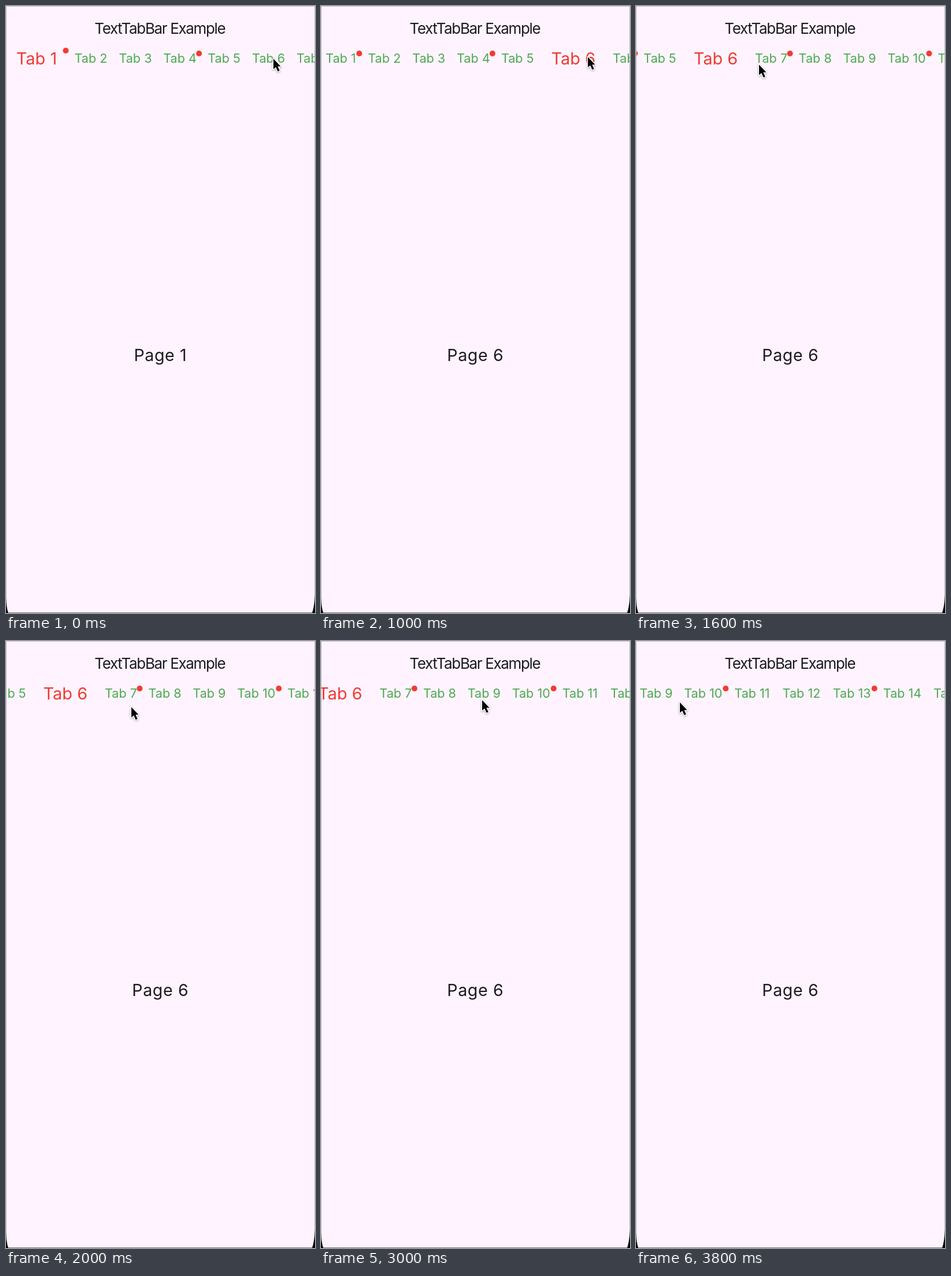
Write an HTML page that moves like this. It is 535 px wide and 1048 px high and loops after 4300 ms.

```html
<!DOCTYPE html>
<html lang="en">
<head>
<meta charset="utf-8">
<title>TextTabBar Example</title>
<style>
  html, body { margin: 0; width: 100%; height: 100%; overflow: hidden; background: #fef3fe; }
  svg { display: block; width: 535px; height: 1048px; }
  text { font-family: Inter, "Open Sans", sans-serif; fill: #1d1b20; }
  .title, .page { text-anchor: middle; }
  .title { font-size: 26px; letter-spacing: -1.36px; }
  .page { font-size: 28.6px; letter-spacing: .6px; }
  #cursor { filter: drop-shadow(0 1.5px 1.5px rgba(0, 0, 0, .35)); }
</style>
</head>
<body>
<svg viewBox="0 0 535 1048">
  <rect width="535" height="1048" fill="#fef3fe"/>
  <text class="title" x="266.3" y="47.6">TextTabBar Example</text>
  <g id="pages">
    <text class="page" x="267.3" y="613">Page 1</text>
    <text class="page" x="802.3" y="613">Page 6</text>
  </g>
  <g id="tabs"></g>
  <g fill="none" stroke="#c4bcc5">
    <path d="M.5 1030V.5H534.5V1030"/>
    <path d="M3 1047.5H532" stroke="#777278"/>
  </g>
  <path d="M0 1021Q.5 1038 4 1048H0ZM535 1016Q534 1037 530 1048H535Z"/>
  <g id="cursor">
    <path d="M0 0V18L4.2 14.4L7.6 22L10.8 20.6L7.4 13.2H12.6Z"
      stroke="#fff" stroke-width="3" stroke-linejoin="round" paint-order="stroke"/>
  </g>
</svg>
<script>
const LOOP = 4300, STEP = 100;
const GREEN = [76, 170, 81], RED = [238, 59, 51];
const ROW_X = -1.3, ROW_Y = 90.2, FONT_SIZE = 21.6;
const NARROW_DIGIT = { 1: 3.8, 7: 1.4 };

// Pointer tip at the turning points of its path: time, x, y
const POINTER = [
  [0, 463, 91], [1000, 462, 88], [1400, 211, 95], [2000, 217, 114],
  [2400, 372, 101], [2700, 372, 101], [3000, 279, 102], [3400, 118, 106], [3800, 76, 106]
];

const mix = (a, b, p) => a + (b - a) * p;
const progress = (t, start, duration) => Math.min(1, Math.max(0, (t - start) / duration));
// Speeds up by the power of attack, then coasts to rest by the power of decay
const fling = (p, attack, decay) => 1 - (1 - p ** attack) ** decay;

function scrollAt(t) {
  return 334 * fling(progress(t, 1000, 1000), 1.5, 3.6)
       + 317 * fling(progress(t, 2700, 1100), 1.9, 2.8);
}

function pointerAt(t) {
  const i = POINTER.findIndex(point => point[0] > t);
  if (i < 0) return POINTER[POINTER.length - 1].slice(1);
  const [from, x, y] = POINTER[i - 1], [to, nextX, nextY] = POINTER[i];
  const p = progress(t, from, to - from);
  return [mix(x, nextX, p), mix(y, nextY, p)];
}

function add(parent, tag) {
  return parent.appendChild(document.createElementNS('http://www.w3.org/2000/svg', tag));
}

function set(node, attrs) {
  for (const key in attrs) node.setAttribute(key, attrs[key]);
}

const [pages, row, cursor] = ['pages', 'tabs', 'cursor'].map(id => document.getElementById(id));

const tabs = Array.from({ length: 16 }, (_, i) => {
  const n = i + 1;
  const label = add(row, 'text');
  label.textContent = 'Tab ' + n;
  const dot = n % 3 === 1 ? add(row, 'circle') : null;
  if (dot) set(dot, { r: 5, fill: '#f23a32' });
  const width = 76.9 + (n > 9 ? 10.2 : 0) - (NARROW_DIGIT[n % 10] || 0);
  return { n, label, dot, width };
});

function placeTab({ label, dot, width }, x, focus) {
  const size = FONT_SIZE * mix(1, 1.34, focus);
  const right = x + width * mix(1, 1.51, focus);
  const color = GREEN.map((c, i) => Math.round(mix(c, RED[i], focus)));
  set(label, { x: x + mix(9.4, 19.1, focus), y: ROW_Y + size * 0.3635 });
  label.style.fontSize = size + 'px';
  label.style.fill = `rgb(${color})`;
  if (dot) set(dot, { cx: right - 5.6, cy: mix(82, 77, focus) });
  return right;
}

function draw(t) {
  const change = fling(progress(t, 270, 400), 1, 2.3);
  let x = ROW_X - scrollAt(t);
  for (const tab of tabs) {
    const focus = tab.n === 1 ? 1 - change : tab.n === 6 ? change : 0;
    x = placeTab(tab, x, focus);
  }
  set(pages, { transform: `translate(${-535 * change} 0)` });
  set(cursor, { transform: `translate(${pointerAt(t)})` });
}

const start = performance.now();
function tick() {
  const t = (performance.now() - start) % LOOP;
  draw(Math.floor(t / STEP) * STEP);
  requestAnimationFrame(tick);
}
tick();
</script>
</body>
</html>
```
